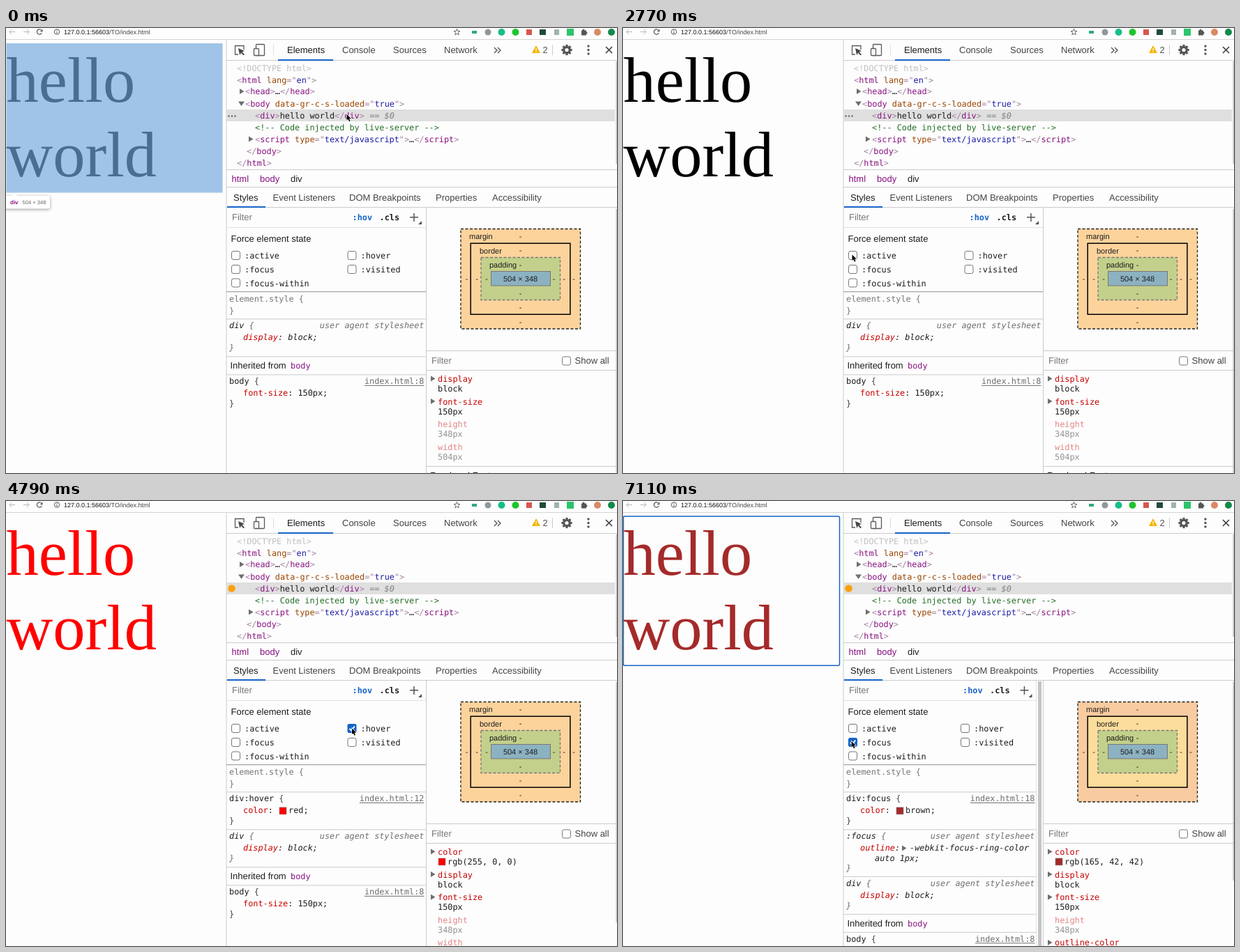
These frames come from a looping animation (876x639 px, 8000 ms). An HTML page with a canvas:

```html
<!DOCTYPE html>
<html lang="en">
<head>
<meta charset="utf-8">
<title>Forcing element state</title>
<style>
html, body { margin: 0; width: 100%; height: 100%; overflow: hidden; background: #fdfdfd; }
canvas { display: block; width: 876px; height: 639px; }
</style>
</head>
<body>
<canvas id="stage"></canvas>
<script>
const W = 876, H = 639, LOOP = 8000;
const canvas = document.getElementById('stage');
const c = canvas.getContext('2d');
const dpr = window.devicePixelRatio || 1;
canvas.width = W * dpr;
canvas.height = H * dpr;

const SANS = '"Liberation Sans", Arial, sans-serif';
const MONO = '11.85px "DejaVu Sans Mono", monospace';
const UI = '13px ' + SANS;
const SMALL = '11px ' + SANS;
const TINY = '9px ' + SANS;
const BG = '#fdfdfd', INK = '#1c1c1c', GREY = '#6e6e6e', RULE = '#cbcbcb', BLUE = '#1663c7';
const TAG = '#881280', PUNCT = '#a380a0', ATTR = '#994500', VALUE = '#1a1aa6', PROP = '#c80000';

const STATES = {
  active: { from: 2920, to: 3930, check: 2920, uncheck: 3760, color: 'green', rgb: '0, 128, 0', line: 15 },
  hover: { from: 4790, to: 5890, check: 4680, uncheck: 5750, color: 'red', rgb: '255, 0, 0', line: 12 },
  focus: { from: 6990, to: LOOP, check: 6870, uncheck: LOOP, color: 'brown', rgb: '165, 42, 42', line: 18 }
};

// time, x, y of the pointer tip; it jumps between samples
const POINTER = [
  [0, 488, 123.5], [1590, 482, 138], [1710, 400, 241], [1850, 364, 271], [2000, 350, 303],
  [2150, 335, 321], [2300, 331, 323], [2415, 329, 324.5], [2530, 328, 325],
  [3930, 430, 332], [4050, 479, 330], [4200, 490, 327], [4320, 495.5, 326],
  [6150, 468, 331], [6270, 408, 341], [6390, 352, 346], [6510, 334.5, 346], [6630, 327, 344.5]
];

function rect(x, y, w, h, fill) {
  c.fillStyle = fill;
  c.fillRect(x, y, w, h);
}

function text(s, x, y, color = INK, font = UI, align = 'left') {
  c.font = font;
  c.fillStyle = color;
  c.textAlign = align;
  c.fillText(s, x, y);
}

// runs alternate text and colour
function code(x, y, runs, style = '') {
  for (let i = 0; i < runs.length; i += 2) {
    text(runs[i], x, y, runs[i + 1], style + MONO);
    x += c.measureText(runs[i]).width;
  }
}

function path(points, color, width = 0, close = false) {
  c.beginPath();
  for (let i = 0; i < points.length; i += 2) c.lineTo(points[i], points[i + 1]);
  if (close) c.closePath();
  if (width) {
    c.strokeStyle = color;
    c.lineWidth = width;
    c.stroke();
  } else {
    c.fillStyle = color;
    c.fill();
  }
}

function disc(x, y, r, color, width = 0) {
  c.beginPath();
  c.arc(x, y, r, 0, Math.PI * 2);
  c.fillStyle = c.strokeStyle = color;
  c.lineWidth = width;
  width ? c.stroke() : c.fill();
}

function round(x, y, w, h, r, fill, stroke, width = 1) {
  c.beginPath();
  c.roundRect(x, y, w, h, r);
  if (fill) { c.fillStyle = fill; c.fill(); }
  if (stroke) { c.strokeStyle = stroke; c.lineWidth = width; c.stroke(); }
}

const rightTri = (x, y) => path([x, y - 4, x + 6.5, y, x, y + 4], '#6e6e6e');
const swatch = (x, y, color) => round(x + .5, y + .5, 10, 10, 0, color, 'rgba(128,128,128,.6)');

function checkbox(x, y, on) {
  if (!on) return round(x + .5, y + .5, 12, 12, 2.5, '#fff', '#767676');
  round(x, y, 13, 13, 2.5, BLUE);
  path([x + 2.8, y + 6.8, x + 5.3, y + 9.4, x + 10.3, y + 3.6], '#fff', 1.9);
}

function browserBar() {
  const arrow = (x, d, color) => {
    path([x - 4, 5.5, x + 4, 5.5], color, 1);
    path([x + d, 2, x + 4 * d, 5.5, x + d, 9], color, 1);
  };
  arrow(9, -1, '#b9b9b9');
  arrow(29, 1, '#b9b9b9');
  c.beginPath();
  c.arc(48, 5.5, 3.6, .4, 5.5);
  c.strokeStyle = '#555';
  c.lineWidth = 1.2;
  c.stroke();
  path([52.5, 1.5, 52.5, 5.2, 48.8, 5.2], '#555');
  disc(73, 5.5, 3.7, '#555', 1);
  rect(72.5, 5, 1, 3, '#555');
  rect(72.5, 3, 1, 1, '#555');
  const host = '127.0.0.1:56603';
  text(host, 83, 9, '#111', TINY);
  text('/TO/index.html', 83 + c.measureText(host).width, 9, '#444', TINY);

  const star = [];
  for (let i = 0; i < 10; i++) {
    const r = i % 2 ? 2 : 4.6, a = i * Math.PI / 5 - Math.PI / 2;
    star.push(646.5 + r * Math.cos(a), 6 + r * Math.sin(a));
  }
  path(star, '#555', .9, true);
  rect(668, 4, 7, 4, '#2eaa7a');
  disc(691, 6, 4.5, '#8f979d');
  disc(710.5, 6, 5, '#15bd8a');
  disc(730.5, 6, 5, '#1fc42c');
  rect(746, 2, 8, 8, '#d9564c');
  rect(765, 2, 9, 8, '#1f4a3a');
  rect(786, 2, 7, 8, '#9fb3ad');
  rect(804, 1, 10, 10, '#2bc46b');
  rect(825, 3.5, 7, 7, '#555');
  disc(828, 3, 1.6, '#555');
  disc(832, 7, 1.6, '#555');
  disc(848, 6, 5, '#d98a63');
  disc(868, 6, 5, '#118a4a');
  rect(0, 16, W, 1, '#d4d4d4');
}

function page(state, lit) {
  const color = state ? state.color : '#000';
  const font = '92.4px "Liberation Serif", "Times New Roman", serif';
  text('hello', .5, 106, color, font);
  text('world', .5, 213, color, font);
  if (state === STATES.focus) round(.5, 22, 310, 214.3, 2, null, BLUE, 1.5);
  if (!lit) return;
  rect(.5, 22, 310, 214.5, 'rgba(111,168,220,.66)');
  c.save();
  c.shadowColor = 'rgba(0,0,0,.4)';
  c.shadowBlur = 4;
  c.shadowOffsetY = 1;
  round(-2, 241, 65, 18.5, 2.5, '#fff');
  c.restore();
  path([7, 241.5, 12, 237, 17, 241.5], '#fff');
  text('div', 6, 253, TAG, 'bold 8px ' + SANS);
  text('504 × 348', 23.5, 253, '#666', '7.6px ' + SANS);
}

function toolbar() {
  path([341, 31, 341, 25.5, 328.5, 25.5, 328.5, 38, 333, 38], '#5a5a5a', 1.3);
  path([333, 29, 342, 33, 338.5, 34.3, 342, 38, 340.5, 39.3, 337, 35.6, 335.2, 39], '#444');
  round(358.5, 23.5, 12, 16, 1, null, '#5a5a5a', 1.3);
  round(355.5, 29.5, 7, 10, 1, BG, '#5a5a5a', 1.3);
  rect(383, 24, 1, 15, '#dcdcdc');
  text('Elements', 403, 36);
  text('Console', 482, 36, '#444');
  text('Sources', 555, 36, '#444');
  text('Network', 628, 36, '#444');
  for (const x of [700, 705]) path([x, 28, x + 4, 32, x, 36], '#555', 1.4);
  path([760, 25, 766, 36, 754, 36], '#f5b400');
  rect(759.4, 29, 1.3, 3.6, '#fff');
  rect(759.4, 33.5, 1.3, 1.3, '#fff');
  text('2', 769.5, 35.5, '#555');
  rect(783, 24, 1, 15, RULE);
  for (let i = 0; i < 8; i++) {
    const a = i * Math.PI / 4, x = Math.cos(a), y = Math.sin(a);
    path([804 + 4 * x, 31.5 + 4 * y, 804 + 7.6 * x, 31.5 + 7.6 * y], '#555', 3.2);
  }
  disc(804, 31.5, 4.2, '#555', 3.2);
  for (const y of [26, 31.5, 37]) disc(835, y, 1.7, '#555');
  path([860, 27, 869, 36], '#444', 1.7);
  path([869, 27, 860, 36], '#444', 1.7);
  rect(316, 46, 560, 1, RULE);
  rect(390, 45, 79, 2, BLUE);
}

function domTree(state, blueRow) {
  rect(316, 117, 557, 17, blueRow ? '#cfe8fc' : '#dfdfdf');
  code(331, 61.5, ['<!DOCTYPE html>', '#c0c0c0']);
  code(331, 78.5, ['<', PUNCT, 'html', TAG, ' lang', ATTR, '="', PUNCT, 'en', VALUE, '">', PUNCT]);
  rightTri(335, 91);
  code(343, 95.4, ['<', PUNCT, 'head', TAG, '>', PUNCT, '…', INK, '</', PUNCT, 'head', TAG, '>', PUNCT]);
  path([333, 105.5, 342, 105.5, 337.5, 112], '#6e6e6e');
  code(343, 112.5, ['<', PUNCT, 'body', TAG, ' data-gr-c-s-loaded', ATTR, '="', PUNCT, 'true', VALUE, '">', PUNCT]);
  if (state) disc(323.5, 125.5, 5.3, '#fba10f');
  else for (const x of [319.5, 324, 328.5]) disc(x, 126.5, 1.2, '#666');
  code(357, 130, ['<', PUNCT, 'div', TAG, '>', PUNCT, 'hello world', INK, '</', PUNCT, 'div', TAG, '>', PUNCT]);
  code(514, 130, [' == ', '#808080']);
  code(542.5, 130, ['$0', '#808080'], 'italic ');
  code(357, 147, ['<!-- Code injected by live-server -->', '#236e25']);
  rightTri(348, 159.5);
  code(357, 164, ['<', PUNCT, 'script', TAG, ' type', ATTR, '="', PUNCT, 'text/javascript', VALUE,
    '">', PUNCT, '…', INK, '</', PUNCT, 'script', TAG, '>', PUNCT]);
  code(345, 181, ['</', PUNCT, 'body', TAG, '>', PUNCT]);
  code(331, 198, ['</', PUNCT, 'html', TAG, '>', PUNCT]);
  rect(874.5, 48, 1.5, 147, '#c4c4c4');

  rect(316, 203, 560, 1, RULE);
  text('html', 323.5, 221, TAG);
  text('body', 364, 221, TAG);
  text('div', 408, 221);
  rect(316, 228, 560, 1, RULE);
  text('Styles', 326, 247.5);
  text('Event Listeners', 382.5, 247.5, '#444');
  text('DOM Breakpoints', 492, 247.5, '#444');
  text('Properties', 616, 247.5, '#444');
  text('Accessibility', 697, 247.5, '#444');
  rect(316, 257, 560, 1, RULE);
  rect(317, 256, 55, 2, BLUE);
}

function statePanel(checked, edge) {
  const shift = edge < 600 ? -9.5 : 0;
  text('Filter', 324, 276, '#777');
  text(':hov', 496.5 + shift, 276, BLUE, 'bold ' + MONO);
  text('.cls', 535.5 + shift, 276, INK, 'bold ' + MONO);
  rect(579 + shift, 271, 12, 1.5, '#555');
  rect(584.2 + shift, 266, 1.5, 12, '#555');
  path([596 + shift, 277, 596 + shift, 282, 591 + shift, 282], '#555');
  rect(316, 286, edge - 316, 1, '#e2e2e2');
  text('Force element state', 322.5, 307.4);
  const right = shift ? 484 : 489.5;
  const boxes = [['active', 323, 320], ['hover', right, 320], ['focus', 323, 340],
    ['visited', right, 340], ['focus-within', 323, 359.5]];
  for (const [name, x, y] of boxes) {
    checkbox(x, y, checked && checked === STATES[name]);
    text(':' + name, x + 19, y + 11, INK, MONO);
  }
  rect(316, 378, edge - 316, 1.3, '#a8a8a8');
}

function origin(s, edge, y, link) {
  text(s, edge - 2.5, y, GREY, (link ? '' : 'italic ') + MONO, 'right');
  const w = c.measureText(s).width;
  if (link) rect(edge - 2.5 - w, y + 1.5, w, 1, GREY);
}

function styleRules(state, edge) {
  const divide = y => rect(316, y, edge - 316, 1, RULE);
  let y = 417.4;
  code(320, 393, ['element.style {', '#777']);
  code(320, 409.5, ['}', '#777']);
  divide(y);
  if (state) {
    const name = Object.keys(STATES).find(k => STATES[k] === state);
    code(320, y + 14, ['div:' + name, INK, ' {', '#444']);
    origin('index.html:' + state.line, edge, y + 14, true);
    code(340, y + 31, ['color', PROP, ':', INK]);
    swatch(391.5, y + 22, state.color);
    code(405, y + 31, [state.color + ';', INK]);
    code(320, y + 46, ['}', '#444']);
    divide(y += 54);
  }
  if (state === STATES.focus) {
    code(320, y + 14, [':focus', INK, ' {', GREY], 'italic ');
    origin('user agent stylesheet', edge, y + 14);
    code(340, y + 31, ['outline', PROP, ':', INK], 'italic ');
    rightTri(400, y + 27);
    code(411, y + 31, ['-webkit-focus-ring-color', INK], 'italic ');
    code(361, y + 45.5, ['auto 1px;', INK], 'italic ');
    code(320, y + 60, ['}', GREY], 'italic ');
    divide(y += 67.5);
  }
  code(320, y + 14, ['div', INK, ' {', GREY], 'italic ');
  origin('user agent stylesheet', edge, y + 14);
  code(340, y + 31, ['display', PROP, ': block;', INK], 'italic ');
  code(320, y + 46, ['}', GREY], 'italic ');
  divide(y += 54);
  text('Inherited from', 321.5, y + 17.8);
  code(408, y + 18, ['body', TAG]);
  divide(y += 26);
  code(320, y + 14, ['body', INK, ' {', '#444']);
  origin('index.html:8', edge, y + 14, true);
  code(340, y + 31, ['font-size', PROP, ': 150px;', INK]);
  code(320, y + 46, ['}', '#444']);
  if (edge < 600) {
    rect(592, 258, 1, H - 258, '#e2e2e2');
    rect(595, 259, 5, H - 259, '#c4c4c4');
  }
}

function boxModel(warm) {
  const ring = (x, y, w, h, fill, stroke, dash, width = 1.3) => {
    rect(x, y, w, h, fill);
    c.strokeStyle = stroke;
    c.lineWidth = width;
    c.setLineDash(dash);
    c.strokeRect(x, y, w, h);
    c.setLineDash([]);
  };
  ring(652, 288.5, 171.5, 143.5, warm ? '#fdd39c' : '#f9cba0', '#222', [4, 2.5]);
  ring(666.2, 309.2, 142.7, 102, warm ? '#fdd39c' : '#fddd9b', '#000', [], 1.5);
  ring(681, 329.5, 113.5, 61, '#c3d08b', '#777', [4, 2.5]);
  ring(695.5, 349.5, 85, 20.5, '#8cb2c2', '#777', [], 1);
  text('margin', 664, 302.5, INK, SMALL);
  text('border', 679, 323.5, INK, SMALL);
  text('padding', 693, 344, INK, SMALL);
  text('504 × 348', 737.5, 364, INK, SMALL, 'center');
  const dash = (x, y) => text('-', x, y + 4, INK, SMALL, 'center');
  for (const y of [298.5, 319, 340, 380.5, 401, 421.5]) dash(737.5, y);
  for (const x of [660.5, 675, 689, 785.5, 800, 814]) dash(x, 360);
}

function computed(state) {
  rect(602, 463, 274, 1, RULE);
  text('Filter', 610, 482, '#777');
  checkbox(797, 471.5, false);
  text('Show all', 815.5, 482, '#444');
  rect(602, 491, 274, 1, RULE);
  const rows = [['display', 'block'], ['font-size', '150px'], ['height', '348px', true]];
  if (state) rows.unshift(['color', 'rgb(' + state.rgb + ')']);
  rows.push(state === STATES.focus ? ['outline-color', ''] : ['width', '504px', true]);
  rows.forEach(([name, value, dim], i) => {
    const y = 508 + i * 32.6, isColor = name === 'color';
    if (!dim) rightTri(609, y - 4.5);
    text(name, 619, y, dim ? '#e38484' : PROP, MONO);
    if (isColor) swatch(619.5, y + 4.5, state.color);
    text(value, isColor ? 633 : 619, y + 14.2, dim ? '#929292' : INK, MONO);
  });
  if (!state) {
    rect(602, 629, 274, 1, RULE);
    text('Rendered Fonts', 608, 646.5);
  }
  const end = !state ? H : state === STATES.focus ? 545 : 605;
  rect(874.5, 260, 1.5, end - 260, '#c4c4c4');
}

function pointer(t) {
  const [, x, y] = POINTER.filter(p => p[0] <= t).pop();
  const shape = [0, 0, 0, 8.6, 2, 6.9, 3.5, 10.2, 5, 9.5, 3.6, 6.3, 6.2, 6.1]
    .map((v, i) => v + (i % 2 ? y + .5 : x + .5));
  path(shape, '#fff', 1.2, true);
  path(shape, '#000');
}

function draw(t) {
  c.setTransform(dpr, 0, 0, dpr, 0, 0);
  c.textRendering = 'geometricPrecision';
  rect(0, 0, W, H, BG);
  const all = Object.values(STATES);
  const state = all.find(s => t >= s.from && t < s.to);
  const checked = all.find(s => t >= s.check && t < s.uncheck);
  const edge = state === STATES.focus ? 593 : 602;
  page(state, t < 1850);
  browserBar();
  rect(315.5, 17, 1, H - 17, RULE);
  toolbar();
  domTree(state, t >= 120 && t < 2770);
  statePanel(checked, edge);
  styleRules(state, edge);
  rect(602, 258, 1, H - 258, RULE);
  boxModel(t < 2920 || state === STATES.hover);
  computed(state);
  pointer(t);
}

const start = performance.now();
function tick() {
  draw((performance.now() - start) % LOOP);
  requestAnimationFrame(tick);
}
tick();
</script>
</body>
</html>
```
